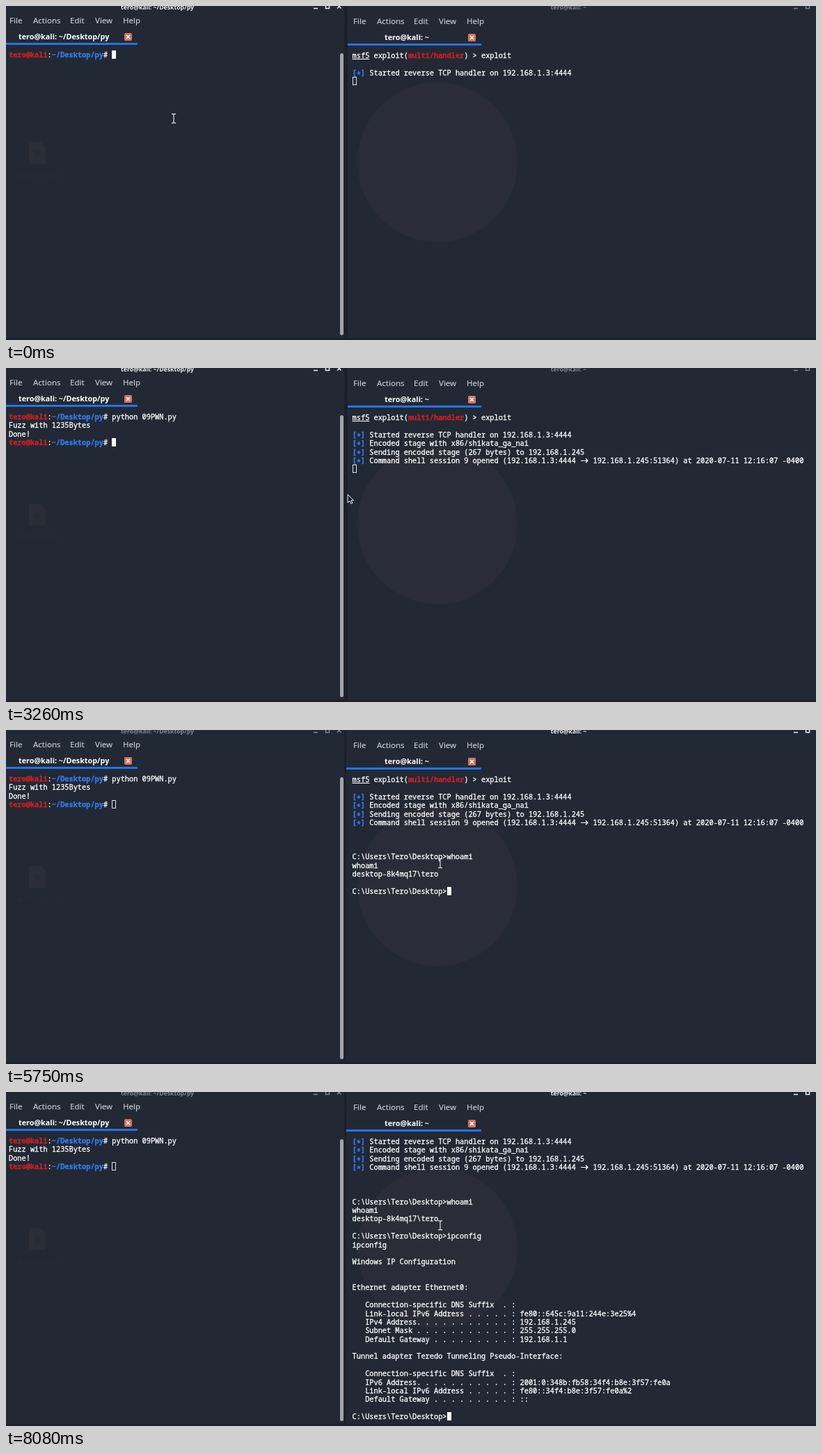
Recreate the animation shown at these times as an HTML page. Size 1164 by 481 pixels, loop 8630 ms.

```html
<!DOCTYPE html>
<html lang="en">
<head>
<meta charset="utf-8">
<title>Two terminals</title>
<style>
  html, body { margin: 0; width: 100%; height: 100%; overflow: hidden; background: #1c202a; }
  #stage { position: relative; width: 1164px; height: 481px; overflow: hidden; }
  #stage > * { position: absolute; }
  .win { top: 0; height: 478px; background: #222934; }
  #left { left: 0; width: 486px; }
  #right { left: 491px; width: 673px; }
  .focus-right #right { left: 489px; width: 675px; }
  .title { top: -5.5px; font-size: 8.7px; line-height: 14px; font-weight: 600; transform: translateX(-50%); }
  .title, .buttons { color: #80848d; }
  #stage:not(.focus-right) .l, .focus-right .r { color: #eceef1; }
  .buttons { top: 0; }
  .menu { color: #c5c9d0; -webkit-text-stroke: 0.15px; }
  .tab { font-size: 10.8px; font-weight: 600; }
  .bar { height: 3px; background: #2473e8; }
  .close { width: 11px; height: 11px; }
  .scroll { left: 480px; top: 68px; width: 5px; height: 406px; border-radius: 3px; background: #a1a4a9; }
  .ui { left: 0; top: 0; width: 1164px; height: 481px; color: #fff; font: 11.5px/16px "Noto Sans", "Open Sans", sans-serif; white-space: pre; }
  .ui > * { position: absolute; }
  pre { margin: 0; color: #fff; font: 500 10.31px/12.375px "Noto Sans Mono", "DejaVu Sans Mono", monospace; -webkit-text-stroke: 0.3px; }
  #shell { left: 4px; top: 64px; }
  #console { left: 497.6px; top: 65px; }
  .red { color: #cc2026; }
  .blue { color: #367bf0; }
  .star { position: relative; top: 2px; }
  .cursor { display: inline-block; width: 1ch; height: 12px; vertical-align: top; background: #fff; }
  .cursor.hollow { background: none; box-shadow: inset 0 0 0 1px #dfe2e6; }
  .arrow { display: inline-block; width: 2ch; height: 12px; vertical-align: top; }
  #mouse { left: 0; top: 0; width: 16px; height: 18px; overflow: visible; }
</style>
</head>
<body>
<div id="stage">
  <div class="win" id="left"></div>
  <div class="win" id="right"></div>

  <svg width="1164" height="481">
    <circle cx="620" cy="225" r="115" fill="#2a2d37"/>
    <path d="M33 196h17l7 7v24h-24z" fill="#2b2d37"/>
    <circle cx="45" cy="213" r="5" fill="#282b35"/>
    <text x="45" y="247" text-anchor="middle" font-family="Noto Sans, sans-serif" font-size="10" fill="#2d2c36">draft-version</text>
  </svg>

  <div class="ui">
    <span class="title l" style="left:217.5px">tero@kali: ~/Desktop/py</span>
    <span class="title r" style="left:808.5px">tero@kali: ~</span>
    <svg class="buttons l" style="left:441px" width="44" height="7" fill="none" stroke="currentColor" stroke-width="1.5">
      <path d="M1 3.5h6M18.5 -2v5.5h5v-5.5M35 -2l5.5 5.5M40.5 -2l-5.5 5.5"/>
    </svg>
    <svg class="buttons r" style="left:1131px" width="33" height="7" fill="none" stroke="currentColor" stroke-width="1.5">
      <path d="M1 3.5h6M18.5 -2v5.5h5v-5.5"/>
    </svg>
    <span class="tab" style="left:18px;top:36px">tero@kali: ~/Desktop/py</span>
    <span class="tab" style="left:544px;top:36.5px">tero@kali: ~</span>
    <i class="bar" style="left:0;top:53px;width:189px"></i>
    <i class="bar" id="rightBar" style="top:54px"></i>
    <i class="scroll"></i>
  </div>

  <pre id="shell"></pre>
  <pre id="console"></pre>

  <svg id="mouse">
    <path id="beam" d="M-3 -6.5h2l1 1 1 -1h2M0 -5.5v11M-3 6.5h2l1 -1 1 1h2" fill="none" stroke="#cfd2d6" stroke-width="1.3"/>
    <path id="pointer" d="M0 0v12l3 -2.5 2 4 2 -1 -2 -3.8h3.5z" fill="#1b1e26" stroke="#eceef0"/>
  </svg>
</div>
<script>
const LOOP = 8630, FOCUS = 3500;
const $ = id => document.getElementById(id);
const ui = document.querySelector('.ui');

function addMenu(x, y) {
  const offsets = { File: 0, Actions: 34, Edit: 87, View: 123, Help: 163 };
  for (const [name, dx] of Object.entries(offsets))
    ui.insertAdjacentHTML('beforeend', `<span class="menu" style="left:${x + dx}px;top:${y}px">${name}</span>`);
}
function addClose(x, y) {
  ui.insertAdjacentHTML('beforeend', `<svg class="close" style="left:${x}px;top:${y}px">
    <rect width="11" height="11" rx="1.5" fill="#d8725c"/>
    <path d="M3 3l5 5M8 3l-5 5" stroke="#fff" stroke-width="1.5"/></svg>`);
}
addMenu(5, 13);
addMenu(499, 13.5);
addClose(170, 39);
addClose(664, 40);

// Latest value whose start time has passed
const at = (steps, t) => steps.filter(s => s[0] <= t).pop().slice(1);
const typed = (text, steps, t) => text.slice(0, at([[0, 0], ...steps], t)[0]);
const cursor = solid => `<i class="cursor${solid ? '' : ' hollow'}"></i>`;

const prompt = '<b class="red">tero@kali</b>:<b class="blue">~/Desktop/py</b># ';
const star = '<b class="blue">[<span class="star">*</span>]</b> ';
const arrow = '<svg class="arrow"><path d="M1 6.5h10M8 3.5l3 3-3 3" fill="none" stroke="#fff" stroke-width="1.2"/></svg>';
const dosPrompt = 'C:\\Users\\Tero\\Desktop>';

const pythonKeys = [[320, 1], [470, 2], [550, 3], [700, 4], [780, 5], [860, 6], [1090, 7], [1240, 8], [1320, 9], [1550, 16]];
const whoamiKeys = [[4820, 1], [4890, 2], [4970, 3], [5140, 4], [5210, 5], [5290, 6]];
const ipconfigKeys = [[6910, 1], [6990, 2], [7220, 3], [7300, 4], [7370, 5], [7450, 7], [7620, 8]];

// Dot leaders sit on odd columns, the colon on column 37
function field(label, value = '') {
  let s = '   ' + label;
  while (s.length < 37) s += s.length % 2 ? '.' : ' ';
  return s + ': ' + value;
}

const report = [
  'ipconfig', '', 'Windows IP Configuration', '', '',
  'Ethernet adapter Ethernet0:', '',
  field('Connection-specific DNS Suffix  '),
  field('Link-local IPv6 Address', 'fe80::645c:9a11:244e:3e25%4'),
  field('IPv4 Address', '192.168.1.245'),
  field('Subnet Mask', '255.255.255.0'),
  field('Default Gateway', '192.168.1.1'), '',
  'Tunnel adapter Teredo Tunneling Pseudo-Interface:', '',
  field('Connection-specific DNS Suffix  '),
  field('IPv6 Address', '2001:0:348b:fb58:34f4:b8e:3f57:fe0a'),
  field('Link-local IPv6 Address', 'fe80::34f4:b8e:3f57:fe0a%2'),
  field('Default Gateway', '::'), '',
  dosPrompt
];

function shellText(t) {
  let s = prompt + typed('python 09PWN.py ', pythonKeys, t);
  if (t >= 2330) s += '\nFuzz with 1235Bytes\nDone!\n' + prompt;
  return s + cursor(t < FOCUS);
}

function consoleText(t) {
  const rows = [
    '<u>msf5</u> exploit(<b class="red">multi/handler</b>) > exploit', '',
    star + 'Started reverse TCP handler on 192.168.1.3:4444'
  ];
  if (t >= 2330) rows.push(star + 'Encoded stage with x86/shikata_ga_nai', star + 'Sending encoded stage (267 bytes) to 192.168.1.245');
  if (t >= 2560) rows.push(star + `Command shell session 9 opened (192.168.1.3:4444 ${arrow} 192.168.1.245:51364) at 2020-07-11 12:16:07 -0400`);
  if (t >= 3650) rows.push('');
  if (t >= 4350) rows.push('', '', dosPrompt + typed('whoami', whoamiKeys, t));
  else rows.push('');
  if (t >= 5750) rows.push('whoami', 'desktop-8k4mq17\\tero', '', dosPrompt + typed('ipconfig', ipconfigKeys, t));
  if (t >= 8080) {
    rows.push(...report);
    rows.splice(0, 2);
  } else if (t >= 8000) rows.push('');
  return rows.join('\n') + cursor(t >= FOCUS);
}

const mousePath = [
  [0, 241, 162, 'beam'], [3110, 318, 166, 'beam'], [3190, 412, 175, 'beam'],
  [3260, 491, 182, 'pointer'], [3340, 552, 187, 'beam'], [3420, 598, 190, 'beam'], [3500, 624, 192, 'beam']
];

function update(el, html) {
  if (el.shown !== html) el.innerHTML = el.shown = html;
}

function draw(t) {
  const focusRight = t >= FOCUS;
  $('stage').classList.toggle('focus-right', focusRight);
  const barX = focusRight ? 489 : 491;
  $('rightBar').style.left = barX + 'px';
  $('rightBar').style.width = 683 - barX + 'px';
  update($('shell'), shellText(t));
  update($('console'), consoleText(t));
  const [x, y, shape] = at(mousePath, t);
  $('mouse').style.transform = `translate(${x}px, ${y}px)`;
  for (const id of ['beam', 'pointer']) $(id).style.display = id === shape ? '' : 'none';
}

const start = performance.now();
function tick() {
  draw((performance.now() - start) % LOOP);
  requestAnimationFrame(tick);
}
tick();
</script>
</body>
</html>
```
